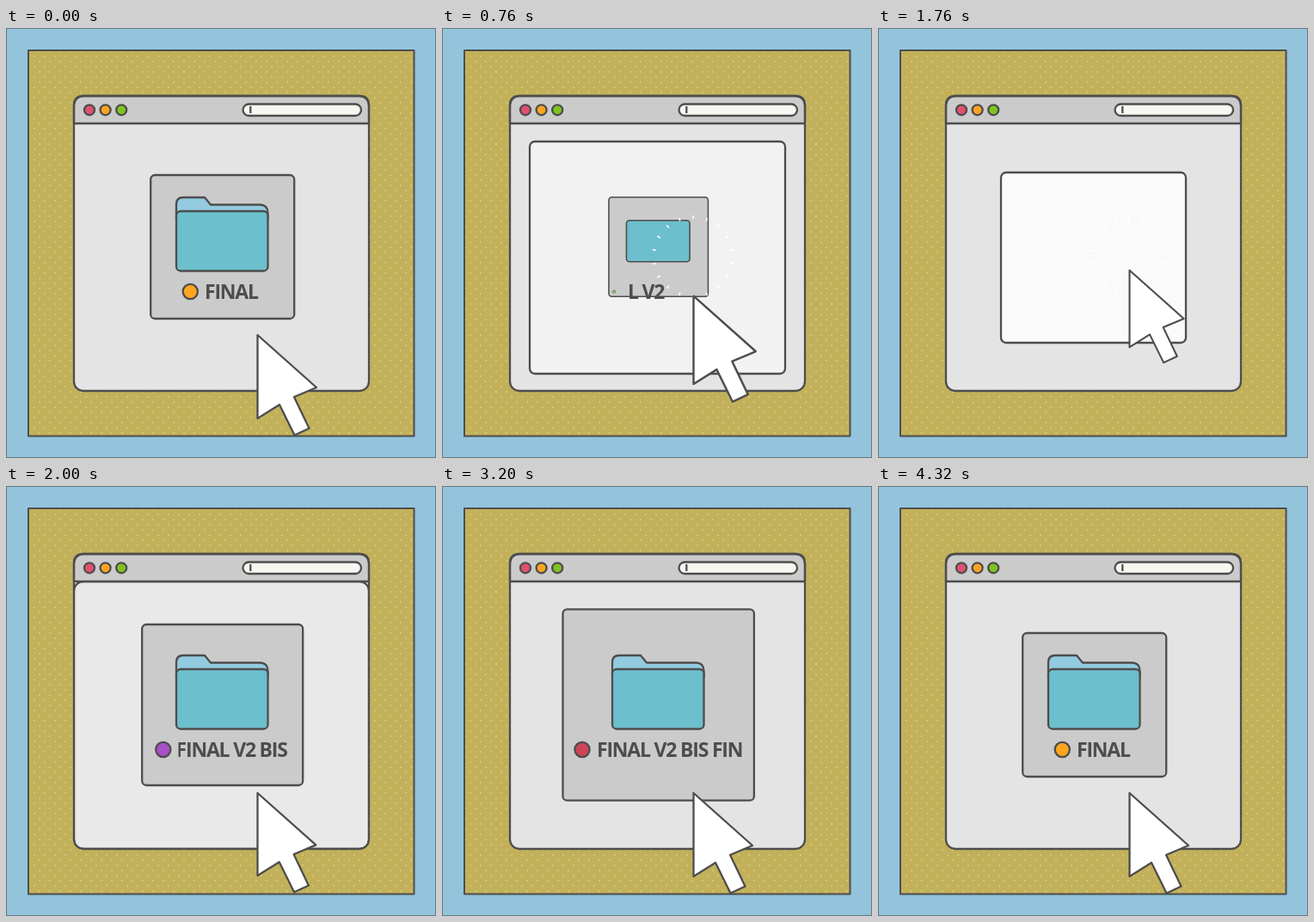
Animation, 500 px wide and 500 px high, one loop 4360 ms. Source, as an HTML page:

```html
<!DOCTYPE html>
<html lang="en">
<head>
<meta charset="utf-8">
<title>Final folder</title>
<style>
  html, body { margin: 0; width: 100%; height: 100%; overflow: hidden; background: #93c4dc; }
  svg { display: block; }
  #stage { width: 100vw; height: 100vh; }
  #stage * { vector-effect: none; }
  .line { stroke: #4d4d4d; stroke-width: 2.3; stroke-linejoin: round; }
  text { font: 700 23px "Open Sans", "Noto Sans", sans-serif; letter-spacing: -1.2px; fill: #4d4d4d; white-space: pre; }
</style>
</head>
<body>
<svg id="stage" viewBox="0 0 500 500">
  <defs>
    <pattern id="dots" width="12" height="12" patternUnits="userSpaceOnUse">
      <circle cx="3" cy="3" r=".8" fill="#e6dba4"/>
      <circle cx="9" cy="9" r=".8" fill="#e6dba4"/>
    </pattern>
    <clipPath id="inside"><rect x="79" y="79" width="343" height="343" rx="11"/></clipPath>
  </defs>

  <rect x=".5" y=".5" width="499" height="499" fill="#93c4dc" stroke="#66777f"/>
  <rect x="26" y="26" width="448.500" height="448.500" fill="#c2b15a"/>
  <rect class="line" x="26" y="26" width="448.500" height="448.500" fill="url(#dots)" style="stroke-width:2"/>
  <rect x="79" y="79" width="343" height="343" rx="11" fill="#e4e4e4"/>

  <g id="body" clip-path="url(#inside)">
    <rect id="panel" class="line" rx="5" fill="#cbcbcb"/>
    <path id="lid" class="line" fill="#93cbe0"
      d="M198 222V205Q198 197 206 197H231L238 205.500H296Q304.500 206 304.500 215V222Z"/>
    <rect id="front" class="line" x="198" y="213" width="106.500" height="69.500" rx="5" fill="#6cbfcd"/>
    <circle id="dot" class="line" cy="306.500" r="8.600"/>
    <svg id="mask" y="290" width="200" height="40"><text id="label" y="25"></text></svg>
    <rect id="page" class="line"/>
    <path id="burst" stroke="#fff" stroke-width="1.600" fill="none"/>
  </g>

  <g class="line">
    <path d="M79 111V90Q79 79 90 79H411Q422 79 422 90V111Z" fill="#cbcbcb"/>
    <rect x="79" y="79" width="343" height="343" rx="11" fill="none"/>
    <circle cx="97" cy="95.300" r="6" fill="#e0506f"/>
    <circle cx="115.600" cy="95.300" r="6" fill="#fba41f"/>
    <circle cx="134.200" cy="95.300" r="6" fill="#7fc31f"/>
    <rect x="275.500" y="88.500" width="137.500" height="13.500" rx="6.750" fill="#f7f7f2"/>
    <path d="M284.300 91V99"/>
  </g>
  <path id="cursor" class="line" fill="#fff" d="M0 0V97L25.500 81L43 116.500L60 108.500L42.500 72L68.500 61Z"/>
</svg>

<script>
const LOOP = 4360, CYCLE = 1080, FRAME = 40, SWAP = 720;
const [body, panel, lid, front, dot, mask, label, page, burst, cursor] =
  ["body", "panel", "lid", "front", "dot", "mask", "label", "page", "burst", "cursor"]
    .map(id => document.getElementById(id));

const versions = [
  { name: "FINAL", color: "#ffa61e", half: 83.5, dotX: 214.3, textX: 232 },
  { name: "FINAL V2", color: "#7ac74f", half: 83.5, dotX: 200, textX: 218 },
  { name: "FINAL V2 BIS", color: "#a850c5", half: 93.5, dotX: 182.8, textX: 200.5 },
  { name: "FINAL V2 BIS FIN", color: "#cf4457", half: 111.2, dotX: 163, textX: 181 }
];

// Each row: time, left, top, right, bottom, red, green, blue
const pageKeys = [
  [600, 198, 213, 304.5, 283, 108, 191, 205],
  [640, 193.5, 214.5, 307.5, 318.5, 252, 255, 252],
  [680, 143, 168, 358, 366, 250, 250, 250],
  [720, 115, 143, 386, 391, 246, 246, 246],
  [760, 102, 132, 399, 402, 242, 242, 242],
  [860, 79, 111, 422, 422, 237, 237, 237],
  [920, 79, 111, 422, 422, 233, 233, 233],
  [1040, 79, 111, 422, 422, 228, 228, 228]
];
const sizeKeys = [[480, 1], [600, .85], [640, .855], [760, 1.055], [840, 1.03], [920, .99], [1000, 1]];

const set = (el, attrs) => { for (const k in attrs) el.setAttribute(k, attrs[k]); };
const show = (el, on) => el.style.display = on ? "" : "none";
const span = (p, start, length) => Math.min(1, Math.max(0, (p - start) / length));
const easeOut = (u, n) => 1 - (1 - u) ** n;
const easeInOut = (u, n) => u < .5 ? (2 * u) ** n / 2 : 1 - (2 - 2 * u) ** n / 2;
const scaleAt = (x, y, s) => `translate(${x} ${y}) scale(${s}) translate(${-x} ${-y})`;

function tween(keys, p) {
  const i = keys.findIndex(k => k[0] > p);
  if (i < 0) return keys[keys.length - 1].slice(1);
  if (i === 0) return keys[0].slice(1);
  const a = keys[i - 1], b = keys[i], u = (p - a[0]) / (b[0] - a[0]);
  return a.slice(1).map((v, j) => v + (b[j + 1] - v) * u);
}

function drawFolder(p, index) {
  const fresh = p >= SWAP;
  const v = versions[(index + fresh) % 4];
  const grow = fresh ? easeOut(span(p, SWAP, 90), 2) : 1;
  const rise = fresh ? easeOut(span(p, 770, 120), 2) : 1;
  const dotSize = fresh ? easeOut(span(p, 744, 150), 2) : 1;
  const slide = fresh ? easeOut(span(p, 700, 290), 3) : 1;

  set(panel, {
    x: 251.7 - v.half, y: 254.5 - v.half, width: 2 * v.half, height: 2 * v.half,
    transform: scaleAt(251.7, 254.5, grow)
  });
  set(front, { transform: scaleAt(251.3, 247.7, grow) });
  set(lid, { transform: `translate(0 ${18 * (1 - rise)})` });
  show(lid, rise > 0);
  set(dot, { cx: v.dotX, fill: v.color, transform: scaleAt(v.dotX, 306.5, dotSize) });
  set(mask, { x: v.textX });
  if (label.textContent !== v.name) label.textContent = v.name;
  const width = 2 * (251.7 - v.dotX) + 17 - (v.textX - v.dotX);
  set(label, { x: -1 - width * (1 - slide) });
}

function drawPage(p) {
  show(page, p > 600 && p < 1040);
  const [x, y, right, bottom, ...rgb] = tween(pageKeys, p);
  set(page, {
    x, y, width: right - x, height: bottom - y,
    rx: p < 680 ? 3 : p < 800 ? 6 : 11, fill: `rgb(${rgb.map(Math.round)})`
  });
  body.insertBefore(page, p < SWAP ? burst : panel);
}

function drawBurst(p) {
  const age = p - 526;
  show(burst, age > 0 && p < 860);
  const outer = 48 * (1 - Math.exp(-age / 33));
  const inner = 48 * (1 - Math.exp(-age / 93));
  let d = "";
  for (let i = 0; i < 18; i++) {
    const a = (i * 20 - 90) * Math.PI / 180;
    const at = r => `${292 + r * Math.cos(a)} ${266 + r * Math.sin(a)}`;
    d += `M${at(inner)}L${at(outer)}`;
  }
  set(burst, { d });
}

function drawCursor(p) {
  const lift = easeInOut(span(p, 0, 360), 3) - easeInOut(span(p, 640, 260), 2);
  set(cursor, { transform: `translate(292.5 ${357 - 79 * lift}) scale(${tween(sizeKeys, p)[0]})` });
}

function draw(now) {
  const t = Math.floor(now % LOOP / FRAME) * FRAME;
  const index = Math.floor(t / CYCLE), p = t % CYCLE;
  drawFolder(p, index);
  drawPage(p);
  drawBurst(p);
  drawCursor(p);
}

const start = performance.now();
function tick() {
  draw(performance.now() - start);
  requestAnimationFrame(tick);
}
tick();
</script>
</body>
</html>
```
